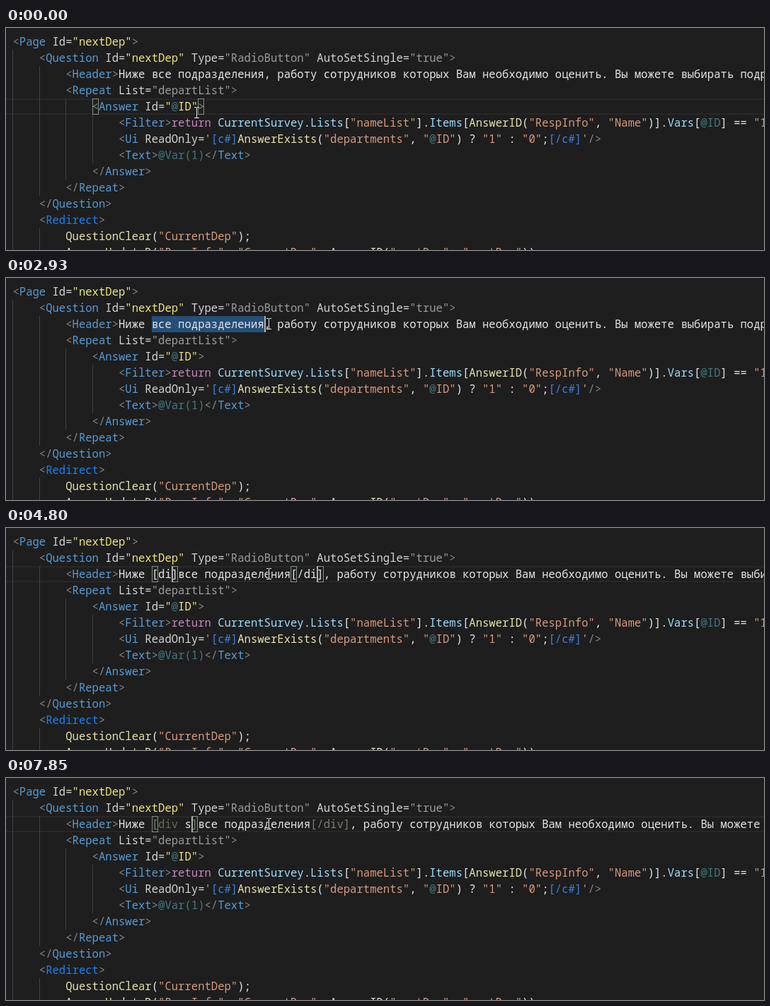
Write an HTML page with a canvas that moves like this. It is 1071 by 315 pixels and loops after 8 s.

```html
<!DOCTYPE html>
<html lang="ru">
<head>
<meta charset="utf-8">
<title>Code editor</title>
<style>
  html, body { margin: 0; width: 100%; height: 100%; overflow: hidden; background: #1e1e1e; }
  canvas { display: block; }
</style>
</head>
<body>
<canvas id="stage" width="1071" height="315"></canvas>
<script>
const ctx = document.getElementById('stage').getContext('2d');
const W = 1071, H = 315, LOOP = 8000;
const CHAR = 9.346, LEFT = 9.45, TOP = 8, ROW = 23, BASELINE = 17;
const HEADER_ROW = 2, TAG_COL = 21, PHRASE = 'все подразделения';

const COLORS = {
  g: '#858585', b: '#569cd6', B: '#1a80f5', a: '#d4d4d4', y: '#eee67c', s: '#9c9c9c',
  w: '#e6e6e6', o: '#d69a7e', p: '#c586c0', v: '#9cdcfe', f: '#e4e2ac', t: '#43797f',
  c: '#3c80e0', k: '#7c7a70', n: '#6b6b52'
};

// "^x" switches to colour x.
const code = [
  '^g<^bPage ^aId=^y"nextDep"^g>',
  '    ^g<^bQuestion ^aId=^y"nextDep" ^aType=^s"RadioButton" ^aAutoSetSingle=^s"true"^g>',
  '',
  '        ^g<^bRepeat ^aList=^s"departList"^g>',
  '            ^g<^bAnswer ^aId=^y"^t@^yID"^g>',
  '                ^g<^bFilter^g>^preturn ^vCurrentSurvey^w.^vLists^w[^o"nameList"^w].^vItems^w[^fAnswerID^w(^o"RespInfo"^w, ^o"Name"^w)].^vVars^w[^t@ID^w] == ^o"1"',
  '                ^g<^bUi ^aReadOnly=^o\'^c[c#]^fAnswerExists^w(^o"departments"^w, ^o"^t@^oID"^w) ? ^o"1" ^w: ^o"0"^w;^c[/c#]^o\'^g/>',
  '                ^g<^bText^g>^t@Var(1)^g</^bText^g>',
  '            ^g</^bAnswer^g>',
  '        ^g</^bRepeat^g>',
  '    ^g</^bQuestion^g>',
  '    ^g<^BRedirect^g>',
  '        ^fQuestionClear^w(^o"CurrentDep"^w);',
  '        ^fAnswerUpdateD^w(^o"RespInfo"^w, ^o"CurrentDep"^w, ^fAnswerID^w(^o"nextDep"^w, ^o"nextDep"^w));'
];

function headerLine(open, close) {
  return '        ^g<^bHeader^g>^wНиже ' + open + '^w' + PHRASE + close +
    '^w, работу сотрудников которых Вам необходимо оценить. Вы можете выбирать подразделения';
}

const ANSWER_PAIR = [[4, 12], [4, 28]];
const headerMarks = (...cols) => cols.map(col => [HEADER_ROW, col]);
const selectTo = col => ({ carets: [col], select: [[TAG_COL, col]] });

// Each entry changes only the listed parts of the editor state.
const events = [
  { t: 0, mouse: [269, 120], row: 4, marks: ANSWER_PAIR, carets: [], select: [], open: '', close: '', matches: false },
  { t: 150, mouse: [257, 109] },
  { t: 270, mouse: [222, 84] },
  { t: 400, mouse: [203, 68] },
  { t: 550, mouse: [201, 63] },
  { t: 700, mouse: [203, 63] },
  { t: 840, mouse: [205, 63] },
  { t: 970, mouse: [206, 64] },
  { t: 1230, row: HEADER_ROW, carets: [TAG_COL] },
  { t: 1350, row: -1, mouse: [222, 64], ...selectTo(23) },
  { t: 1500, mouse: [287, 65], marks: [], ...selectTo(28) },
  { t: 1620, mouse: [338, 66], ...selectTo(33) },
  { t: 1770, mouse: [363, 66], ...selectTo(37) },
  { t: 1890, mouse: [369, 66], ...selectTo(38) },
  { t: 2400, mouse: [371, 65], carets: [] },
  { t: 2930, carets: [38] },
  { t: 3250, open: '^k[^nu^k]', close: '^k[/^nu^k]', carets: [23, 44], select: [[22, 23], [43, 44]], matches: true },
  { t: 3680, carets: [] },
  { t: 4270, carets: [23, 44] },
  { t: 4680, open: '^w[d]', close: '^w[/d]', row: HEADER_ROW, select: [], matches: false, marks: headerMarks(21, 23, 41, 44) },
  { t: 4800, open: '^w[di]', close: '^w[/di]', carets: [24, 46], marks: headerMarks(21, 24, 42, 46) },
  { t: 5230, open: '^k[^ndiv^k]', close: '^k[/div]', carets: [25, 48], marks: headerMarks(21, 25, 43, 48) },
  { t: 5510, carets: [25], marks: headerMarks(21, 25) },
  { t: 5940, carets: [] },
  { t: 6500, carets: [25] },
  { t: 6650, open: '^k[^ndiv ^k]', carets: [26], marks: headerMarks(21, 26) },
  { t: 7050, carets: [] },
  { t: 7600, carets: [26] },
  { t: 7850, open: '^k[^ndiv ^ws^k]', carets: [27], marks: headerMarks(21, 27) }
];

const xAt = col => LEFT + col * CHAR;
const snapX = col => Math.round(xAt(col));
const yAt = row => TOP + row * ROW;

function fill(color, x, y, w, h) {
  ctx.fillStyle = color;
  ctx.fillRect(x, y, w, h);
}

function fillCols(color, row, from, to) {
  fill(color, snapX(from), yAt(row), snapX(to) - snapX(from), ROW);
}

function drawGuides(line, row) {
  const indent = line.search(/\S/);
  for (let col = 0; col < indent; col += 4) fill('#404040', snapX(col), yAt(row), 1, ROW);
}

function drawLine(line, row) {
  let col = 0;
  line.split('^').forEach((part, i) => {
    if (i) ctx.fillStyle = COLORS[part[0]];
    for (const ch of i ? part.slice(1) : part) {
      if (ch !== ' ') ctx.fillText(ch, xAt(col), yAt(row) + BASELINE);
      col++;
    }
  });
}

function drawMatches(line, row) {
  const plain = line.replace(/\^./g, '');
  for (const { index } of plain.matchAll(/u/gi)) {
    fillCols('rgba(173,214,255,0.15)', row, index, index + 1);
  }
}

function drawMark([row, col]) {
  const x = snapX(col), y = yAt(row), w = snapX(col + 1) - x;
  fill('rgba(0,100,0,0.1)', x, y, w, ROW);
  ctx.strokeStyle = '#888';
  ctx.lineWidth = 1;
  ctx.strokeRect(x + 0.5, y + 0.5, w - 1, ROW - 1);
}

function drawMouse([x, y]) {
  const beam = (color, pad) => {
    fill(color, x - pad, y - 7 - pad, 1 + 2 * pad, 15 + 2 * pad);
    for (const end of [y - 8, y + 7]) {
      fill(color, x - 3 - pad, end, 3 + pad, 1);
      fill(color, x + 1, end, 3 + pad, 1);
    }
  };
  beam('rgba(20,20,20,0.6)', 1);
  beam('#f0f0f0', 0);
}

function draw(time) {
  const state = Object.assign({}, ...events.filter(e => e.t <= time));
  const lines = code.slice();
  lines[HEADER_ROW] = headerLine(state.open, state.close);

  fill('#1e1e1e', 0, 0, W, H);
  if (state.row >= 0) {
    const y = yAt(state.row);
    fill('#282828', 0, y, W, 2);
    fill('#282828', 0, y + ROW - 2, W, 2);
  }
  lines.forEach(drawGuides);
  if (state.matches) lines.forEach(drawMatches);
  state.select.forEach(([from, to]) => fillCols('#264f78', HEADER_ROW, from, to));
  state.marks.forEach(drawMark);

  ctx.font = `500 ${CHAR / 0.6}px "Noto Sans Mono", "DejaVu Sans Mono", monospace`;
  lines.forEach(drawLine);
  state.carets.forEach(col => fill('#aeafad', snapX(col), yAt(HEADER_ROW), 2, ROW));
  drawMouse(state.mouse);
}

const start = performance.now();
function frame() {
  draw((performance.now() - start) % LOOP);
  requestAnimationFrame(frame);
}
frame();
</script>
</body>
</html>
```
